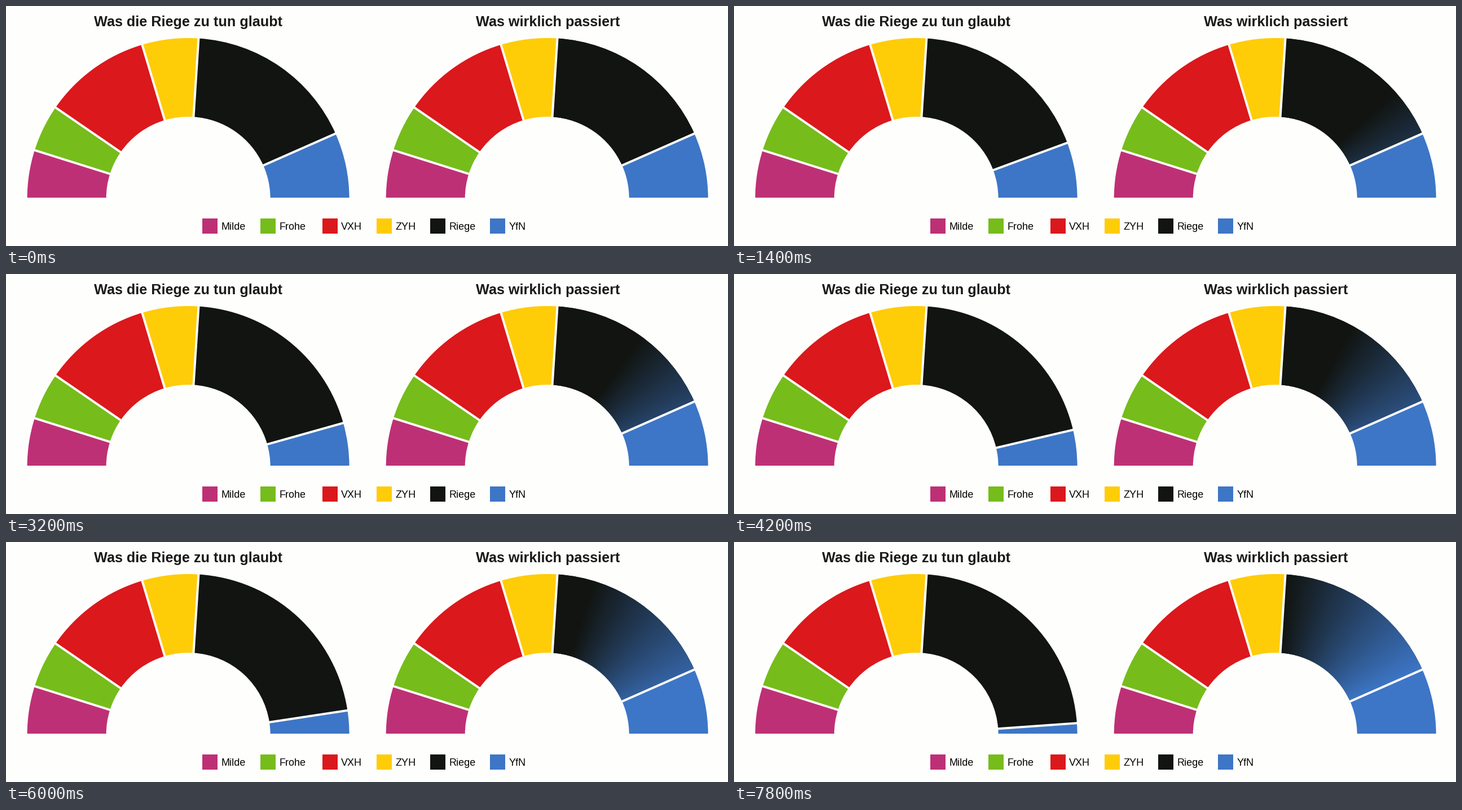
A matplotlib script that plays this animation: 1280 px wide and 427 px high, repeating every 8 s.

```python
import numpy as np
import matplotlib.pyplot as plt
from matplotlib.animation import FuncAnimation
from matplotlib.colors import to_rgb
from matplotlib.patches import Rectangle, Wedge

W, H, DPI = 1280, 427, 64
STEP = 200                      # ms per frame
FRAMES = 40
PAPER = "#fefefd"
BLACK, BLUE = "#111410", "#3d76c6"
R_OUT, R_IN, BASE = 285.5, 145.5, 342.5
LEFT, RIGHT = 323.1, 959.2
SEATS = [69, 67, 153, 80, 246, 94]
DEG = 180 / sum(SEATS)          # degrees per seat
# sector borders in degrees, counted clockwise from the left end
BORDERS = DEG * np.cumsum([0] + SEATS)
COLORS = ["#be3075", "#76bc1b", "#db181c", "#ffcc08", BLACK, BLUE]
LABELS = ["Milde", "Frohe", "VXH", "ZYH", "Riege", "YfN"]
KEYS_X = [348, 451, 561, 657, 752, 858]

plt.rcParams["font.family"] = "Liberation Sans"
fig = plt.figure(figsize=(W / DPI, H / DPI), dpi=DPI, facecolor=PAPER)
ax = fig.add_axes([0, 0, 1, 1])
ax.axis("off")


def px(size):
    return size * 72 / DPI


def sector(cx, start, end, color):
    # the y axis points down, so clockwise angles shift by 180 degrees
    patch = Wedge((cx, BASE), R_OUT, 180 + start, 180 + end,
                  width=R_OUT - R_IN, fc=color, lw=0, zorder=2)
    return ax.add_patch(patch)


def spoke(angle, cx):
    a = np.radians(angle)
    r = np.array([R_IN - 3, R_OUT + 3])
    return cx - r * np.cos(a), BASE - r * np.sin(a)


def draw_chart(cx, title, title_x):
    parts = [sector(cx, a, b, c)
             for a, b, c in zip(BORDERS, BORDERS[1:], COLORS)]
    lines = [ax.plot(*spoke(a, cx), color=PAPER, lw=px(4), zorder=4,
                     solid_capstyle="butt")[0] for a in BORDERS[1:-1]]
    # the pale outline also trims the flat lower edge
    ax.add_patch(Rectangle((cx - 300, 341), 600, 4, fc=PAPER, lw=0, zorder=5))
    ax.text(title_x, 36, title, size=px(25.3), weight="bold",
            color="#1a1a1a", ha="center", va="baseline")
    return parts, lines


parts, lines = draw_chart(LEFT, "Was die Riege zu tun glaubt", 323.5)
right_parts, right_lines = draw_chart(RIGHT, "Was wirklich passiert", 960.2)

for x, color, label in zip(KEYS_X, COLORS, LABELS):
    ax.add_patch(Rectangle((x, 378), 27, 27, fc=color, lw=0))
    ax.text(x + 33.2, 398.5, label, size=px(18), color="black", va="baseline")

# angular distance of each pixel from the lower border, 0 to 1
x0, x1, y0, y1 = 960, 1240, 50, 300
gx, gy = np.meshgrid(np.arange(x0, x1) + 0.5, np.arange(y0, y1) + 0.5)
angle = 180 - np.degrees(np.arctan2(BASE - gy, gx - RIGHT))
dist = (BORDERS[5] - angle) / (BORDERS[5] - BORDERS[4])
dark, bright = np.array(to_rgb(BLACK)), np.array(to_rgb(BLUE))


def shade(t):
    reach = 0.14 * (1 - np.exp(-t / 0.4)) + 0.11 * t
    mix = np.clip(reach - dist, 0, 1)[..., None]
    return dark + (bright - dark) * mix


glow = ax.imshow(shade(0), extent=(x0, x1, y1, y0), zorder=3,
                 interpolation="nearest", aspect="auto")
glow.set_clip_path(right_parts[4])
ax.set_xlim(0, W)
ax.set_ylim(H, 0)


def update(i):
    # two seats change hands on every step
    border = BORDERS[5] + 2 * i * DEG
    parts[4].set_theta2(180 + border)
    parts[5].set_theta1(180 + border)
    lines[-1].set_data(*spoke(border, LEFT))
    glow.set_data(shade(i * STEP / 1000))
    return parts[4], parts[5], lines[-1], glow


anim = FuncAnimation(fig, update, frames=FRAMES, interval=STEP,
                     repeat=True, repeat_delay=0)
plt.show()
```
